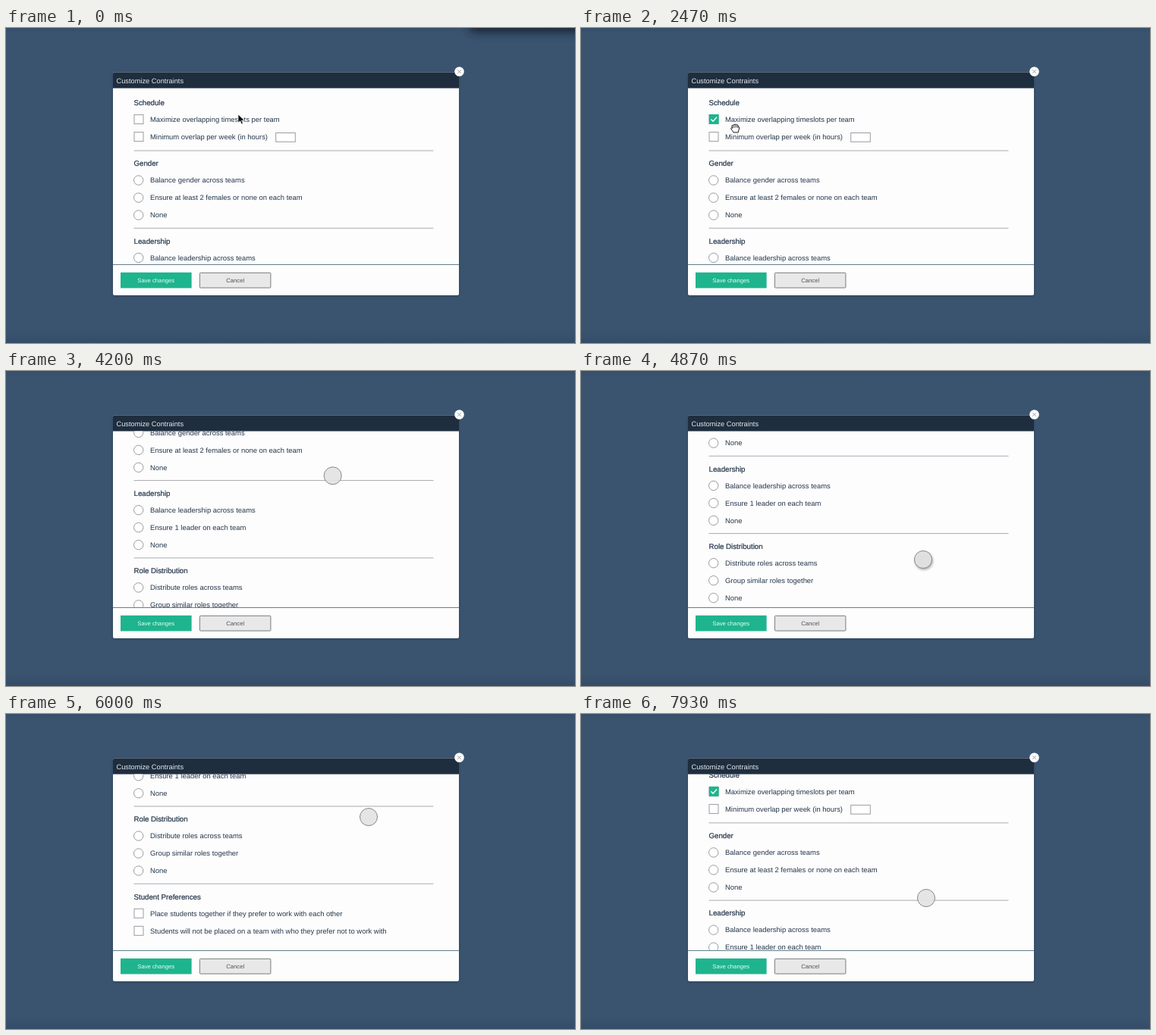
Recreate the animation shown at these times as an HTML page. Size 750 by 416 pixels, loop 8 s.

```html
<!DOCTYPE html>
<html lang="en">
<head>
<meta charset="utf-8">
<title>Customize constraints</title>
<style>
  html, body { margin: 0; width: 100%; height: 100%; overflow: hidden; background: #3a5470; }
  svg { display: block; width: 100vw; height: 100vh; }
  text {
    font: 9.43px "Liberation Sans", Arial, sans-serif;
    fill: #26374a;
    text-rendering: geometricPrecision;
  }
  .heading { font-size: 9.7px; stroke: #26374a; stroke-width: .22px; }
  .title { font-size: 9.28px; fill: #e4e9ee; }
  .button { font-size: 7.7px; text-anchor: middle; }
  .control { fill: #fff; stroke: #999ca0; }
  .rule { stroke: #aaacaf; }
</style>
</head>
<body>
<svg viewBox="0 0 750 416">
  <defs>
    <linearGradient id="edges" x2="0" y2="1">
      <stop offset="0" stop-color="#263a52" stop-opacity=".2"/>
      <stop offset=".02" stop-color="#263a52" stop-opacity="0"/>
      <stop offset=".96" stop-color="#263a52" stop-opacity="0"/>
      <stop offset="1" stop-color="#263a52" stop-opacity=".3"/>
    </linearGradient>
    <filter id="blur" x="-30%" y="-150%" width="160%" height="400%"><feGaussianBlur stdDeviation="6"/></filter>
    <filter id="soft" x="-20%" y="-20%" width="140%" height="140%"><feGaussianBlur stdDeviation="1.5"/></filter>
    <clipPath id="body"><rect x="141" y="79.5" width="456" height="233"/></clipPath>
  </defs>

  <rect width="750" height="416" fill="#3a5470"/>
  <rect width="750" height="416" fill="url(#edges)"/>
  <rect id="corner" x="612" y="-20" width="160" height="26" fill="#1b2838" filter="url(#blur)"/>

  <rect x="141" y="59" width="456" height="295" rx="2" fill="#1c2a3a" opacity=".45" filter="url(#soft)"/>
  <rect x="141" y="58.5" width="456" height="294.5" rx="2" fill="#fdfdfe"/>
  <path d="M141 79.5V60.5a2 2 0 0 1 2-2H595a2 2 0 0 1 2 2V79.5Z" fill="#1f2e3e"/>
  <text class="title" x="145.5" y="73">Customize Contraints</text>

  <g clip-path="url(#body)"><g id="form"></g></g>

  <path d="M141 312.5H597" stroke="#647f89"/>
  <rect x="151" y="322.8" width="93.6" height="20.7" fill="#1eb48d"/>
  <text class="button" x="197.7" y="336.3" style="fill:#e6fff6">Save changes</text>
  <rect x="255.4" y="323.3" width="93.5" height="19.8" rx="1" fill="#e8e8e8" stroke="#777b7f"/>
  <text class="button" x="302.2" y="336.3" style="fill:#4c5258">Cancel</text>
  <circle cx="597.5" cy="57.5" r="6.3" fill="#fff"/>
  <path d="M595.3 55.3l4.4 4.4m0-4.4l-4.4 4.4" stroke="#858a90" stroke-width=".8"/>

  <g id="arrow">
    <path d="M0 0V11.2L2.6 8.8 4.4 12.9 6.3 12.1 4.6 8.1H8.2Z" fill="#0b0b0b" stroke="#fff" stroke-width=".7"/>
  </g>
  <g id="hand">
    <path d="M-2.4 5.4C-3 3.5-5 1.8-5.5.3-5.7-.9-4.4-1.2-3.5-.1L-4.4-2.7C-4.8-4.2-3.2-4.6-2.6-3.2L-2.2-4.4C-2-5.7-.4-5.6-.2-4.4.2-5.8 1.8-5.6 2-4.2 2.6-5 3.9-4.6 3.9-3.2L4-1.9C5-2.4 5.6-1.6 5.4-.5 5.1 1.7 4.3 3.5 3.9 5.4Z"
      fill="#fff" stroke="#161616"/>
    <path d="M-2.6-3.2L-1.8-.6M-.2-4.4V-.9M2-4.2L1.8-.9M3.9-3.2L3.6-.6" fill="none" stroke="#161616" stroke-width=".8"/>
  </g>
  <g id="touch">
    <circle id="lift" cx="1" cy="1.7" r="12" opacity=".3" filter="url(#soft)"/>
    <circle r="11.5" fill="#e3e3e3" fill-opacity=".93" stroke="#85878a"/>
  </g>
</svg>

<script>
const el = id => document.getElementById(id);

const radio = y => `<circle class="control" cx="174.7" cy="${y}" r="6.2"/>`;
const checkbox = y => `<rect class="control" x="169" y="${y - 6}" width="12" height="12"/>`;

const sections = [
  ['Schedule', checkbox, 'Maximize overlapping timeslots per team', 'Minimum overlap per week (in hours)'],
  ['Gender', radio, 'Balance gender across teams', 'Ensure at least 2 females or none on each team', 'None'],
  ['Leadership', radio, 'Balance leadership across teams', 'Ensure 1 leader on each team', 'None'],
  ['Role Distribution', radio, 'Distribute roles across teams', 'Group similar roles together', 'None'],
  ['Student Preferences', checkbox, 'Place students together if they prefer to work with each other',
    'Students will not be placed on a team with who they prefer not to work with']
];

function section([title, control, ...options], index) {
  const top = index ? 76.7 + 102.3 * index : 98.5;
  const rule = index ? `<path class="rule" d="M168.5 ${top - 17}H563.5"/>` : '';
  const rows = options.map((words, i) => {
    const y = top + 22.1 + 23 * i;
    return control(y) + `<text x="190" y="${y + 3.3}">${words}</text>`;
  });
  return `${rule}<text class="heading" x="168.5" y="${top + 3.4}">${title}</text>${rows.join('')}`;
}

el('form').innerHTML = sections.map(section).join('') + `
  <rect class="control" x="355.7" y="138.5" width="25.6" height="11.8"/>
  <g id="check"><rect x="168.8" y="114" width="12.8" height="12.8" fill="#1eb48d"/>
  <path d="M171.4 120.5l2.6 2.7 5-5.4" fill="none" stroke="#fff" stroke-width="1.4"/></g>`;

// Each move: start and end time, then where the pointer arrives.
const origin = [306, 114];
const moves = [
  [70, 870, 182, 128], [930, 1270, 199.5, 143], [1270, 1670, 176, 124],
  [2800, 3330, 411, 258], [3730, 4400, 436, 106], [4400, 4870, 451, 249],
  [5670, 6000, 478, 136], [6000, 6330, 476, 145], [6600, 6800, 480, 345],
  [6800, 7400, 457, 216.5], [7670, 7930, 455, 243]
];
const presses = [[3730, 4400], [5530, 6330], [6600, 6800], [7470, 8000]];
const maxScroll = 244.7;

const clamp = (v, low, high) => Math.min(high, Math.max(low, v));
const ease = u => u * u * (3 - 2 * u);

function pointerAt(t) {
  let [x, y] = origin;
  for (const [start, end, toX, toY] of moves) {
    const u = ease(clamp((t - start) / (end - start), 0, 1));
    x += (toX - x) * u;
    y += (toY - y) * u;
  }
  // One small loop away from the checkbox and back after ticking it.
  const sway = Math.sin(Math.PI * clamp((t - 1930) / 800, 0, 1));
  return [x + 32 * sway, y + 10 * sway];
}

// While pressed, the pointer drags the form along with it.
function scrollAt(t) {
  let scroll = 0;
  for (const [start, end] of presses) {
    if (t < start) break;
    const dragged = pointerAt(start)[1] - pointerAt(Math.min(t, end))[1];
    scroll = clamp(scroll + dragged, 0, maxScroll);
  }
  return scroll;
}

const show = (id, visible) => el(id).setAttribute('display', visible ? 'inline' : 'none');
const move = (id, x, y) => el(id).setAttribute('transform', `translate(${x} ${y})`);

function draw(now) {
  const t = now % 8000;
  const cursor = t < 700 ? 'arrow' : t < 2830 ? 'hand' : 'touch';

  for (const id of ['arrow', 'hand', 'touch']) show(id, id === cursor);
  move(cursor, ...pointerAt(t));
  move('form', 0, -scrollAt(t));
  show('check', t >= 1930);
  show('lift', !presses.some(([start, end]) => t >= start && t <= end));
  el('corner').setAttribute('opacity', clamp(1 - (t - 70) / 300, 0, 1));
  requestAnimationFrame(draw);
}
requestAnimationFrame(draw);
</script>
</body>
</html>
```
